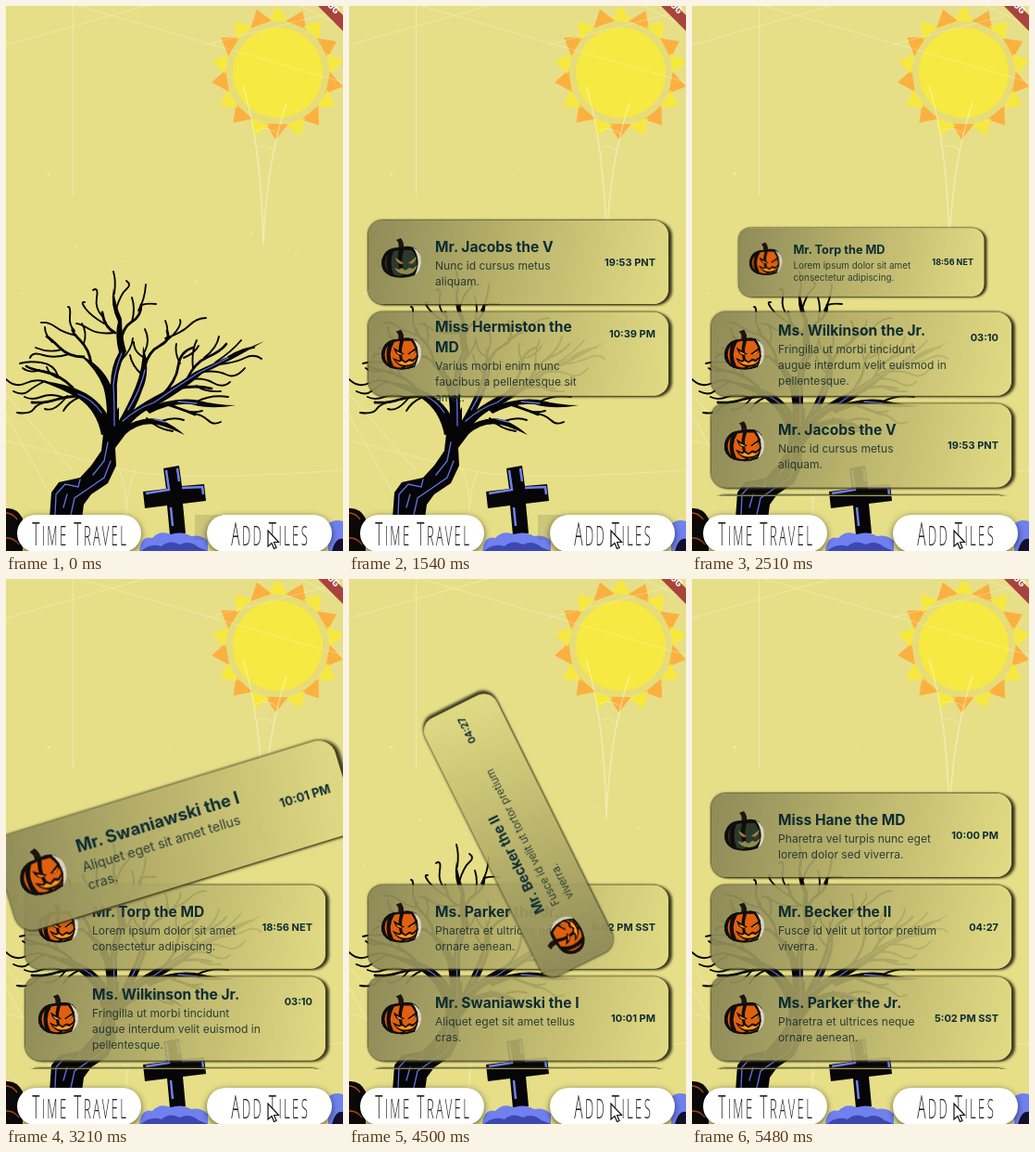
An HTML page without scripts for the animation above (5500 ms loop, 364 by 587 pixels).

```html
<!DOCTYPE html>
<html lang="en">
<head>
<meta charset="utf-8">
<title>Halloween tiles</title>
<style>
@property --n { syntax: "<integer>"; inherits: true; initial-value: 0; }

html, body { margin: 0; width: 100%; height: 100%; overflow: hidden; background: #e6df88; }
.stage {
  position: relative; width: 364px; height: 587px; overflow: hidden;
  font-family: Inter, "Open Sans", sans-serif; color: #0c2c33;
  animation: count 5.5s step-end infinite;
}
.scene, .front { position: absolute; inset: 0; width: 364px; height: 587px; }

/* --n: how many tiles have been added */
@keyframes count {
  0% { --n: 0; }
  1.455% { --n: 1; }
  14.545% { --n: 2; }
  28.727% { --n: 3; }
  40.545% { --n: 4; }
  54.727% { --n: 5; }
  66.364% { --n: 6; }
  80% { --n: 7; }
  92.909% { --n: 8; }
}
@keyframes pop {
  0% { transform: rotate(-180deg) scale(0); }
  2.6% { transform: rotate(-90deg) scale(1.35); }
  3.9% { transform: rotate(0deg) scale(1.14); }
  5%, 6.5% { transform: rotate(0deg) scale(.817); }
  6.54%, 100% { transform: none; }
}
@keyframes glow {
  0% { opacity: 1; }
  7.4%, 100% { opacity: 0; }
}
@keyframes press {
  0%, 11.82%, 25.45%, 37.82%, 51.82%, 64.73%, 77.09%, 91.09% { opacity: 1; }
  1.455%, 14.545%, 28.727%, 40.545%, 54.727%, 66.364%, 80%, 92.909% { opacity: 0; }
}

.list { position: absolute; left: 0; top: 26px; width: 364px; height: 502px; overflow: hidden; }
.tile {
  position: absolute; left: 21px; top: 205px; width: 324px; height: 90px;
  border-radius: 16px; box-sizing: border-box; padding: 1px 0 0 72px;
  display: flex; flex-direction: column; justify-content: center;
  background: linear-gradient(100deg, rgba(137,134,86,.95), rgba(178,172,103,.9) 45%, rgba(226,218,132,.92));
  box-shadow: 4px 1px 3px #3d3a20, -1px -1px 2px rgba(70,66,38,.85), 0 1px 2px #3d3a20;
  translate: 0 calc((var(--n) - var(--i)) * 98.7px);
  opacity: clamp(0, var(--n) - var(--i) + 1, 1);
  animation: pop 5.5s calc(var(--t) * 1ms) linear infinite;
}
.tile.tall { justify-content: flex-start; padding-top: 5px; }
.tile b { font-size: 15.6px; line-height: 22px; white-space: nowrap; }
.tile p { margin: 0; font-size: 12.1px; line-height: 17px; white-space: nowrap; color: rgba(22,44,46,.88); }
.tile time {
  position: absolute; right: 14px; top: calc(37px + var(--up, 0px));
  font-size: 11px; line-height: 16px; font-weight: 700;
}
.tile svg { position: absolute; left: 13px; top: 18px; width: 46px; height: 46px; }
.lit { opacity: clamp(0, var(--n) - var(--i), 1); }
.new { animation: glow 5.5s calc(var(--t) * 1ms) step-end infinite; }
.first { --skin: #d8570f; --eyes: none; }
.first .new { display: none; }

.btn {
  position: absolute; top: 548px; height: 40px; border-radius: 20px; background: #fff;
  box-shadow: 0 2px 7px rgba(0,0,0,.6); color: #222; text-align: center;
}
.btn span {
  display: block; transform: scaleY(2.2); white-space: nowrap; letter-spacing: 2.4px; margin-right: -2.4px;
  font: 300 13px/40px "Open Sans", sans-serif; text-transform: uppercase;
}
.btn i { font-style: normal; font-size: 15.5px; }
.travel { left: 12px; width: 134px; }
.add { left: 217px; width: 135px; }
.shade {
  position: absolute; left: 204px; top: 548px; width: 30px; height: 27px;
  background: rgba(70,70,50,.16); animation: press 5.5s step-end infinite;
}
</style>
</head>
<body>
<div class="stage">

<svg class="scene" viewBox="0 0 364 587">
  <defs>
    <g id="rays">
      <path d="M-11,-56 L0,-72 L11,-56z" fill="#f7e83e"/>
      <path d="M-12,-55 L1,-72 L12,-55z" fill="#fbb040" transform="rotate(21)"/>
    </g>
    <g id="rays3">
      <use href="#rays"/><use href="#rays" transform="rotate(40)"/><use href="#rays" transform="rotate(80)"/>
    </g>
    <g id="body">
      <path d="M19,13 Q21,6 17,3 L22,1 Q26,6 25,13z" fill="#1d1510"/>
      <path d="M22,11 Q38,6 43,20 Q46,34 37,41 Q24,46 11,42 Q0,37 1,26 Q4,10 22,11z" fill="#100d0b"/>
      <path d="M35,11 Q45,16 44,28 Q43,37 37,41 Q45,25 35,11z" fill="#d9d4bd"/>
    </g>
    <g id="dark">
      <use href="#body"/>
      <path d="M8,18 Q2,27 8,38 Q5,27 8,18z M14,15 Q9,27 14,40 Q19,43 24,41 Q16,28 20,14z M25,14 Q21,27 27,41 L36,38 Q43,26 34,14z" fill="var(--skin, #2c3a2c)"/>
      <g style="display:var(--eyes)">
        <path d="M16,22 L25,28 Q19,31 16,22z M39,21 L30,28 Q37,30 39,21z M15,33 L20,35 23,33 27,36 31,33 35,34 40,30 Q37,40 27,40 Q19,40 15,33z" fill="#8f8b4c"/>
        <path d="M20,26 l4,2 -3,1z M35,26 l-3,2 3,1z" fill="#d8570f"/>
      </g>
    </g>
    <g id="orange">
      <use href="#body"/>
      <path d="M8,18 Q1,27 8,38 Q5,27 8,18z M15,14 Q7,27 14,40 Q20,43 24,41 Q17,28 21,13z M25,13 Q20,27 27,42 L36,39 Q43,26 33,13z" fill="#e0600f"/>
      <path d="M14,20 L26,27 Q17,32 14,20z M40,19 L29,27 Q38,30 40,19z M13,31 L20,34 23,32 27,35 31,32 35,33 41,28 Q39,41 27,41 Q18,41 13,31z" fill="#180c06"/>
      <path d="M17,24 L24,27.500 Q19,29 17,24z M38,23 L31,27.500 Q36,28 38,23z M16,34 L20,36 23,34.500 27,37 31,34.500 35,35.500 39,32 Q36,39 27,39 Q20,39 16,34z" fill="#ff9c1c"/>
    </g>
    <symbol id="pumpkin" viewBox="0 0 46 46"><use href="#dark"/></symbol>
    <symbol id="lantern" viewBox="0 0 46 46"><use href="#orange"/></symbol>
  </defs>

  <rect width="364" height="587" fill="#e6df88"/>

  <g transform="translate(293.500,72)">
    <use href="#rays3"/><use href="#rays3" transform="rotate(120)"/><use href="#rays3" transform="rotate(240)"/>
    <circle r="55" fill="#e6dc78"/>
    <circle r="48.500" fill="#f6e942"/>
  </g>

  <!-- cobwebs -->
  <g fill="none" stroke="#fffbe0" stroke-opacity=".3" stroke-width="1.1">
    <path d="M72.500,0 V204" stroke-width="1.500"/>
    <path d="M78,0 L364,82 M0,42 L150,0 M215,42 L364,4 M318,0 L364,22"/>
    <path d="M256,86 Q276,150 278,258 M303,104 Q281,170 278,258" stroke-width="1.500" stroke-opacity=".45"/>
    <path d="M269,135 Q281,128 294,138 M272,152 Q281,147 289,156"/>
    <path d="M0,468 Q70,485 125,499 T364,500 M0,418 L72,500 M0,440 L60,548 M122,499 Q131,520 130,548 M140,499 Q131,518 130,548"/>
  </g>
  <g fill="#fffbe0" fill-opacity=".5">
    <circle cx="46" cy="181" r="1.300"/><circle cx="205" cy="297" r="1.300"/><circle cx="126" cy="275" r="1"/>
    <circle cx="76" cy="259" r="1"/><circle cx="265" cy="245" r="1"/><circle cx="178" cy="181" r=".8"/>
    <circle cx="313" cy="268" r="1"/><circle cx="17" cy="309" r="1"/>
  </g>

  <!-- trunk and limbs -->
  <g fill="#050507">
    <path d="M47,552 L49,524 L57,513 L80,508 L92,495 L103,479 L105,461 L99,440 L112,446 L122,432 L122,448 L140,434 L130,460 L118,476 L119,495 L110,514 L92,526 L84,537 L82,552z"/>
    <path d="M103,462 Q98,436 79,423 Q60,412 37,404 Q66,406 86,417 Q110,431 118,460z"/>
    <path d="M108,462 Q111,430 105,410 Q98,392 80,376 Q103,386 113,408 Q113,388 122,373 Q117,354 121,340 Q112,322 116,304 Q118,322 125,337 Q125,356 130,372 Q118,395 120,420 Q119,440 124,460z"/>
    <path d="M113,462 Q128,438 158,422 Q185,408 204,394 Q236,379 279,361 Q241,383 212,396 Q190,415 163,430 Q138,440 126,462z"/>
    <path d="M120,450 Q132,430 140,410 Q148,390 148,366 Q157,392 147,414 Q141,432 129,450z"/>
    <path d="M150,434 Q178,421 204,424 Q228,430 248,430 Q222,435 200,429 Q178,427 155,439z"/>
    <path d="M122,456 Q148,440 168,446 Q182,452 193,462 Q176,454 164,451 Q144,447 128,462z"/>
  </g>
  <g fill="none" stroke="#050507" stroke-linecap="round" stroke-linejoin="round">
    <g stroke-width="2.800">
      <path d="M124,362 Q126,346 136,340 T146,322 M118,352 Q106,346 104,330 M92,385 Q90,370 80,360 T72,348 M84,378 Q68,378 58,368 T44,356 M72,411 Q58,397 42,394 T22,388 M86,420 Q66,420 54,424 T28,427"/>
      <path d="M150,388 Q154,372 166,366 T174,350 M168,420 Q184,404 186,388 T202,368 M196,401 Q204,384 218,378 T238,364 M186,412 Q204,408 222,412 M170,428 Q190,434 204,440"/>
    </g>
    <g stroke-width="1.900">
      <path d="M117,310 Q119,296 116,286 M119,326 Q124,310 130,305 T130,296 M136,340 Q140,326 136,314 M146,322 Q154,320 162,321 M143,328 Q150,316 151,300"/>
      <path d="M104,334 Q96,326 98,314 T94,306 M106,342 Q92,334 86,326 T85,319 M116,352 Q100,354 90,348 T76,342 M84,364 Q88,352 82,342 M74,350 Q68,344 69,334 T67,324 M76,355 Q62,352 54,346 T38,341"/>
      <path d="M60,370 Q46,374 32,368 M50,362 Q42,354 42,346 M68,375 Q52,380 40,376 T26,379 M56,398 Q52,386 38,384 T15,385 M60,401 Q48,400 44,389 M36,392 Q26,396 18,390"/>
      <path d="M50,407 Q34,400 22,406 T0,402 M42,404 Q30,410 24,415 T8,415 M60,421 Q48,417 38,421 T20,421 M46,426 Q34,428 30,434 T12,438 M66,420 Q60,428 54,432 T42,434 M78,422 Q68,426 62,436"/>
      <path d="M174,352 Q175,346 172,339 M168,364 Q178,358 184,350 T188,338 M172,358 Q190,352 198,344 T216,336 M152,380 Q138,374 138,362 M150,372 Q156,360 150,348 M148,398 Q136,388 134,376 M124,382 Q136,370 137,358"/>
      <path d="M188,385 Q182,374 184,364 M192,379 Q204,374 208,366 M202,390 Q200,372 206,360 M214,379 Q228,368 230,356 M226,384 Q244,372 254,360 M240,378 Q256,368 268,368 M230,386 Q248,384 258,379 T276,380"/>
      <path d="M212,394 Q228,392 238,397 T258,390 M200,402 Q214,400 224,406 T242,405 M206,409 Q214,416 232,415 M206,426 Q222,418 240,421 M196,437 Q212,440 218,446 T232,448 M182,431 Q198,440 212,436 M168,447 Q182,442 192,446 M152,444 Q164,456 180,458"/>
    </g>
  </g>
  <g fill="none" stroke="#6472e4" stroke-width="1.300" stroke-linecap="round">
    <path d="M117,452 Q117,425 116,408 Q118,390 125,374 M126,447 Q142,433 160,427 L182,412 L208,395 M132,435 Q146,412 150,392 M103,438 Q94,424 78,418 M208,395 L240,379 M160,445 L172,448 M186,426 L206,428"/>
    <path d="M53,548 L54,526 L64,515 L78,518 L80,510 M70,548 L74,530 L90,519 L106,508 L113,490 M94,505 L106,490 L110,470 M62,540 L66,526"/>
  </g>

  <!-- grave cross -->
  <path d="M170,498 L187,495 L190,517 L214,515 L216,533 L191,536 L194,568 L177,570 L174,538 L150,541 L148,523 L173,520z" fill="#060608"/>
  <path d="M173,500 L176,521 L151,525 M190,519 L212,518 L213,526 M185,498 L187,512 M178,540 L180,560" fill="none" stroke="#7381f0" stroke-width="2.500"/>

  <!-- ground -->
  <path d="M144,587 Q146,570 158,573 Q166,564 178,569 Q190,565 200,571 Q210,569 218,576 V587z" fill="#7080ee"/>
  <path d="M146,587 Q156,578 168,582 Q176,574 188,580 Q198,575 208,583 L218,587z" fill="#3c48b0"/>
  <path d="M348,587 V558 Q354,552 364,555 V587z" fill="#7080ee"/>
  <path d="M352,587 Q356,572 364,574 V587z" fill="#12102a"/>
  <path d="M0,541 Q12,540 18,552 L18,587 H0z" fill="#0c0908"/>
  <path d="M0,546 Q7,546 12,553 M0,573 Q8,572 14,580" fill="none" stroke="#a8481a" stroke-width="1.500"/>

  <path d="M337,0 L364,27 V10 L354,0z" fill="#a9433b"/>
  <text transform="translate(356,9) rotate(45)" text-anchor="end" font-family="Roboto, sans-serif" font-weight="900" font-size="10" fill="#fff">DEBUG</text>
</svg>

<div class="list">
  <div class="tile tall first" style="--i:1;--t:80;--up:-22px">
    <svg><use href="#pumpkin"/><use class="lit" href="#lantern"/><use class="new" href="#lantern"/></svg>
    <b>Miss Hermiston the<br>MD</b><p>Varius morbi enim nunc<br>faucibus a pellentesque sit<br>amet.</p><time>10:39 PM</time>
  </div>
  <div class="tile" style="--i:2;--t:800">
    <svg><use href="#pumpkin"/><use class="lit" href="#lantern"/><use class="new" href="#lantern"/></svg>
    <b>Mr. Jacobs the V</b><p>Nunc id cursus metus<br>aliquam.</p><time>19:53 PNT</time>
  </div>
  <div class="tile" style="--i:3;--t:1580;--up:-18px">
    <svg><use href="#pumpkin"/><use class="lit" href="#lantern"/><use class="new" href="#lantern"/></svg>
    <b>Ms. Wilkinson the Jr.</b><p>Fringilla ut morbi tincidunt<br>augue interdum velit euismod in<br>pellentesque.</p><time>03:10</time>
  </div>
  <div class="tile" style="--i:4;--t:2230">
    <svg><use href="#pumpkin"/><use class="lit" href="#lantern"/><use class="new" href="#lantern"/></svg>
    <b>Mr. Torp the MD</b><p>Lorem ipsum dolor sit amet<br>consectetur adipiscing.</p><time>18:56 NET</time>
  </div>
  <div class="tile" style="--i:5;--t:3010">
    <svg><use href="#pumpkin"/><use class="lit" href="#lantern"/><use class="new" href="#lantern"/></svg>
    <b>Mr. Swaniawski the I</b><p>Aliquet eget sit amet tellus<br>cras.</p><time>10:01 PM</time>
  </div>
  <div class="tile" style="--i:6;--t:3650">
    <svg><use href="#pumpkin"/><use class="lit" href="#lantern"/><use class="new" href="#lantern"/></svg>
    <b>Ms. Parker the Jr.</b><p>Pharetra et ultrices neque<br>ornare aenean.</p><time>5:02 PM SST</time>
  </div>
  <div class="tile" style="--i:7;--t:4400">
    <svg><use href="#pumpkin"/><use class="lit" href="#lantern"/><use class="new" href="#lantern"/></svg>
    <b>Mr. Becker the II</b><p>Fusce id velit ut tortor pretium<br>viverra.</p><time>04:27</time>
  </div>
  <div class="tile" style="--i:8;--t:5060">
    <svg><use href="#pumpkin"/><use class="lit" href="#lantern"/><use class="new" href="#lantern"/></svg>
    <b>Miss Hane the MD</b><p>Pharetra vel turpis nunc eget<br>lorem dolor sed viverra.</p><time>10:00 PM</time>
  </div>
</div>

<div class="shade"></div>
<div class="btn travel"><span><i>T</i>ime <i>T</i>ravel</span></div>
<div class="btn add"><span><i>A</i>dd <i>T</i>iles</span></div>

<svg class="front" viewBox="0 0 364 587">
  <path d="M283,565 V582 L287,578.500 L289.500,584.500 L292,583.500 L289.500,577.500 H294.500z" fill="#fff" stroke="#111" stroke-width="1.200"/>
</svg>

</div>
</body>
</html>
```
